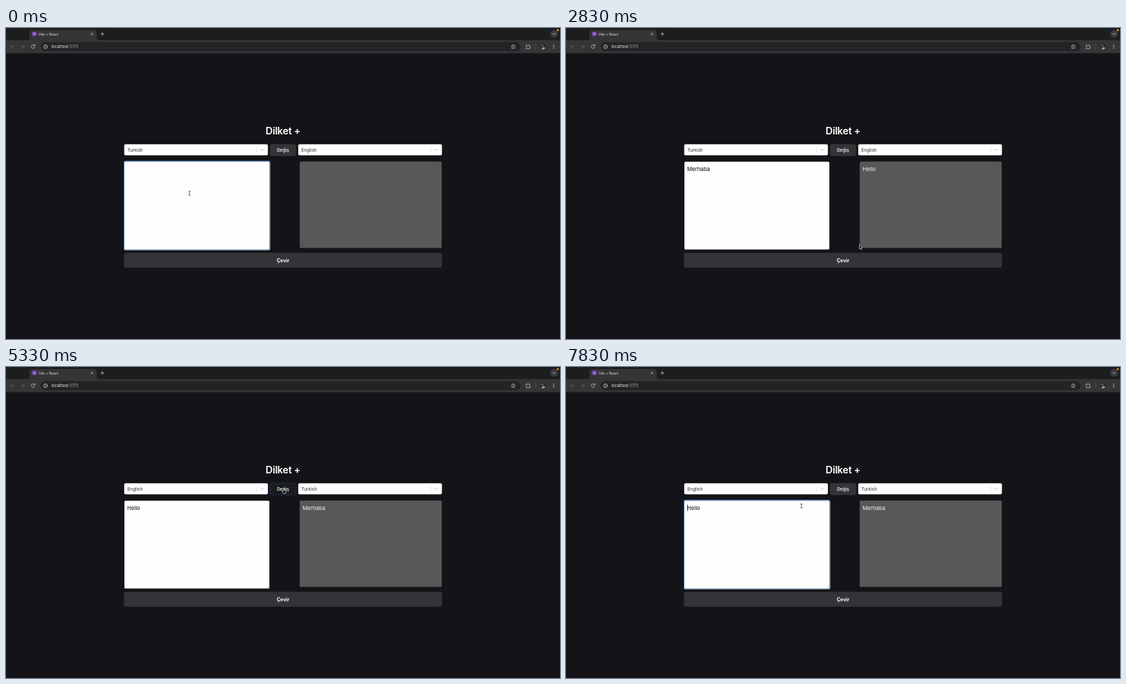
These frames come from a looping animation (800 px wide and 450 px high, 8000 ms). An HTML page:

```html
<!DOCTYPE html>
<html lang="tr">
<head>
<meta charset="utf-8">
<title>Vite + React</title>
<style>
  html, body { margin: 0; width: 100%; height: 100%; overflow: hidden; background: #141418; }
  svg { display: block; width: 100%; height: 100%; font-family: Inter, "Liberation Sans", sans-serif; }
  text { white-space: pre; }
  .line { fill: none; stroke-linecap: round; stroke-linejoin: round; }
  .mid { text-anchor: middle; fill: #fff; }
  .lang { font-size: 6.5px; fill: #2a2a2c; }
  .body { font-size: 7.8px; }
</style>
</head>
<body>
<svg viewBox="0 0 800 450">
  <defs>
    <filter id="shade" x="-30%" y="-30%" width="180%" height="180%">
      <feDropShadow dx="4" dy="4" stdDeviation="3" flood-color="#000" flood-opacity=".45"/>
    </filter>
    <g id="select">
      <rect width="207.5" height="16" rx="2" fill="#fff"/>
      <path d="M191.5 4v8" stroke="#ccc" stroke-width=".5"/>
      <path class="line" d="M197 7l2.4 2.3L201.800 7" stroke="#bbb" stroke-width=".9"/>
    </g>
  </defs>
  <rect width="800" height="450" fill="#141418"/>

  <!-- browser bar -->
  <rect width="800" height="18" fill="#1c1d1f"/>
  <path d="M30 18q4 0 4-4V7q0-4 4-4h89q4 0 4 4v7q0 4 4 4z" fill="#353537"/>
  <rect y="17.500" width="800" height="19" fill="#353537"/>
  <rect x="50" y="20.500" width="693" height="13" rx="6.500" fill="#232326"/>
  <circle cx="41" cy="8.500" r="3" fill="#8f5cf0"/>
  <text x="47" y="10.600" font-size="5" fill="#e6e6e6">Vite + React</text>
  <g class="line" stroke="#d4d4d6" stroke-width=".7">
    <path d="M122.700 7.200l2.800 2.800m0-2.800l-2.800 2.800M137 8.600h4.400m-2.200-2.200v4.400"/>
    <path d="M41.400 25.400a2.600 2.600 0 1 0 .3 2.200M41.700 24.100v1.700H40"/>
    <circle cx="57" cy="27" r="2.700"/>
    <path d="M57 26.700v1.700M57 25.500v.1"/>
    <path d="M732.500 24.100l.9 1.900 2.100.3-1.500 1.500.3 2.100-1.800-1-1.800 1 .3-2.100-1.500-1.500 2.100-.3z"/>
    <path d="M751.200 25.200h1.600a1 1 0 0 1 2 0h1.500v1.500a1 1 0 0 1 0 2v1.300h-5.100v-1.500a.9.9 0 0 0 0-1.700z"/>
    <g stroke="#68686b">
      <path d="M12 27H7m2.200-2.200L7 27l2.200 2.200M21.500 27h5m-2.200-2.200l2.200 2.200-2.200 2.200"/>
      <path d="M765 23.500v7" stroke-width=".5"/>
    </g>
  </g>
  <text x="65.500" y="28.900" font-size="5.800" fill="#ececee">localhost<tspan fill="#b0b0b4">:5173</tspan></text>
  <circle cx="775.500" cy="27" r="4.200" fill="#25282a"/>
  <path d="M773.500 30.400a2.700 2.700 0 0 1 5.200-1.100 4.200 4.200 0 0 1-5.200 1.100z" fill="#b99a72"/>
  <circle cx="774.500" cy="25.400" r="1.500" fill="#71695c"/>
  <g fill="#d8d8da"><circle cx="791" cy="24.700" r=".7"/><circle cx="791" cy="27" r=".7"/><circle cx="791" cy="29.300" r=".7"/></g>
  <circle cx="791.500" cy="8.500" r="5.700" fill="#38393b"/>
  <path class="line" d="M789.800 7.900l1.800 1.700 1.800-1.700" stroke="#ddd" stroke-width=".8"/>
  <circle cx="796.800" cy="3" r="1.500" fill="#f09a28"/>

  <!-- page -->
  <text class="mid" x="400" y="153.800" font-size="14.400" font-weight="600" letter-spacing="-.3">Dilket +</text>
  <use href="#select" x="170.700" y="168.300"/>
  <use href="#select" x="422" y="168.300"/>
  <text class="lang" id="langA" x="175.200" y="178.700"></text>
  <text class="lang" id="langB" x="426.500" y="178.700"></text>
  <rect id="swap" x="381.500" y="168.300" width="37.300" height="16.700" rx="2.500" stroke-width=".6"/>
  <text class="mid" x="400" y="179" font-size="6.500" font-weight="500">Değiş</text>

  <g id="ring">
    <rect x="170" y="192.500" width="211.500" height="129" rx="2" fill="#dfe8f5"/>
    <rect x="170" y="192.500" width="211" height="128.500" rx="2" fill="#3f78c9"/>
  </g>
  <rect x="171" y="193.500" width="209.300" height="127" rx="1.500" fill="#fffefe"/>
  <path class="line" d="M377.200 319.400l2.200-2.200M378.600 319.400l.8-.8" stroke="#999" stroke-width=".4"/>
  <text class="body" id="textA" x="175" y="206.700" fill="#0c0c0e"></text>
  <rect id="caret" y="199" width=".7" height="9.300" fill="#111"/>

  <rect x="424.200" y="193.300" width="205" height="125" rx="1.500" fill="#585858"/>
  <text class="body" id="textB" x="428.300" y="206.700" fill="#f2f2f2"></text>
  <rect id="send" x="170.700" y="325.700" width="458.600" height="20.800" rx="2.500" stroke-width=".7"/>
  <text class="mid" x="400" y="338.500" font-size="7" font-weight="700">Çevir</text>

  <g id="caps">
    <rect x="366.600" y="358.500" width="67" height="46.500" fill="#f2f2f2" filter="url(#shade)"/>
    <g class="line" stroke="#151515" stroke-width="1.500">
      <path d="M391.800 378l4-9.500 2 4.800M393.200 375.200h3.300M400.300 378l4-9.500 4 9.500M403.500 375.200h3.700"/>
      <path d="M393.600 380.500l13.400-14"/>
    </g>
    <text x="400" y="389" font-size="5.700" font-weight="500" text-anchor="middle" fill="#222">Caps Lock Off</text>
  </g>

  <g id="pointer">
    <g id="click">
      <circle r="7" fill="none" stroke="#fff" stroke-width="1.800"/>
      <circle r="6.300" fill="none" stroke="#111" stroke-width="1.500"/>
    </g>
    <path id="beam" class="line" d="M-1.200-3q1.200 0 1.200.8v4.400q0 .8 1.200.8M1.200-3q-1.200 0-1.200.8M0 2.200q0 .8-1.200.8" stroke="#222" stroke-width=".7"/>
    <path id="arrow" d="M-.5-.5v6.200l1.500-1.300 1 2.200 1-.5-1-2.100h2z" fill="#0a0a0a" stroke="#fff" stroke-width=".55"/>
    <path id="hand" d="M-.6-1.800q.7-.7 1.300 0v2.300l2.200.6q.7.300.6 1l-.5 2.700h-3.500l-2-2.700q.3-1 1.300-.2z" fill="#111" stroke="#fff" stroke-width=".6"/>
  </g>
</svg>
<script>
const $ = id => document.getElementById(id);
const LOOP = 8000, STEP = 500 / 3;
const between = (n, a, b) => n >= a && n < b;
const show = (id, on) => $(id).setAttribute('visibility', on ? 'inherit' : 'hidden');

// step, x, y
const path = [
  [0, 265, 239], [9, 265, 239], [10, 310, 268], [11, 366, 314], [12, 397, 331], [13, 400, 334],
  [16, 400, 334], [17, 424, 314], [18, 462, 275], [19, 494, 249], [20, 503.5, 243], [21, 504, 238],
  [22, 468, 210], [23, 468, 210], [24, 456, 209], [26, 447, 207], [28, 460.5, 210],
  [29, 432, 194], [30, 402, 178], [32, 401, 178], [33, 340, 199], [34, 250, 217], [35, 215.5, 221],
  [37, 215.5, 221], [38, 250, 220], [39, 362, 219], [40, 470, 218], [41, 526, 218],
  [42, 522, 217], [43, 495, 214], [44, 432, 208], [45, 372, 203], [46, 346, 201], [47, 340, 201]
];

function place(n) {
  const i = Math.max(1, path.findIndex(p => p[0] >= n));
  const [a, x, y] = path[i - 1], [b, u, v] = path[i];
  const f = (n - a) / (b - a);
  return [x + (u - x) * f, y + (v - y) * f];
}

function paintButton(id, hover) {
  $(id).setAttribute('fill', hover ? '#1a1b1e' : '#343438');
  $(id).setAttribute('stroke', hover ? '#293b66' : '#343438');
}

function draw(time) {
  const n = Math.min(47, Math.floor((time % LOOP + 4) / STEP));
  const [x, y] = place(n);
  const swapped = n >= 32;
  const focused = n < 15 || n >= 35;
  const typed = 'Merhaba'.slice(0, Math.max(0, n + 1));

  $('langA').textContent = swapped ? 'English' : 'Turkish';
  $('langB').textContent = swapped ? 'Turkish' : 'English';
  $('textA').textContent = swapped ? 'Hello' : n === 0 ? '' : typed;
  $('textB').textContent = swapped ? 'Merhaba' : n >= 17 ? 'Hello' : '';

  // The blink restarts after each key or click.
  const since = n < 6 ? 0 : n < 35 ? n - 6 : n < 46 ? n - 35 : 0;
  show('caret', focused && n > 0 && since % 6 < 3);
  const end = n < 46 ? $('textA').getComputedTextLength() : 0;
  $('caret').setAttribute('x', 175 + end);

  show('ring', focused);
  show('caps', between(n, 3, 16));

  const onSend = between(x, 171, 629) && between(y, 325, 347);
  const onSwap = between(x, 381, 419) && between(y, 168, 185);
  const inText = between(x, 171, 380) && between(y, 193, 321);
  paintButton('send', onSend);
  paintButton('swap', onSwap);
  $('pointer').setAttribute('transform', `translate(${x} ${y})`);
  show('pointer', !between(n, 1, 9));
  show('beam', inText);
  show('hand', onSend || onSwap);
  show('arrow', !inText && !onSend && !onSwap);
  show('click', n === 15 || n === 31 || between(n, 35, 37));
}

const start = performance.now();
function tick(now) {
  draw(Math.max(0, now - start));
  requestAnimationFrame(tick);
}
draw(0);
requestAnimationFrame(tick);
</script>
</body>
</html>
```
